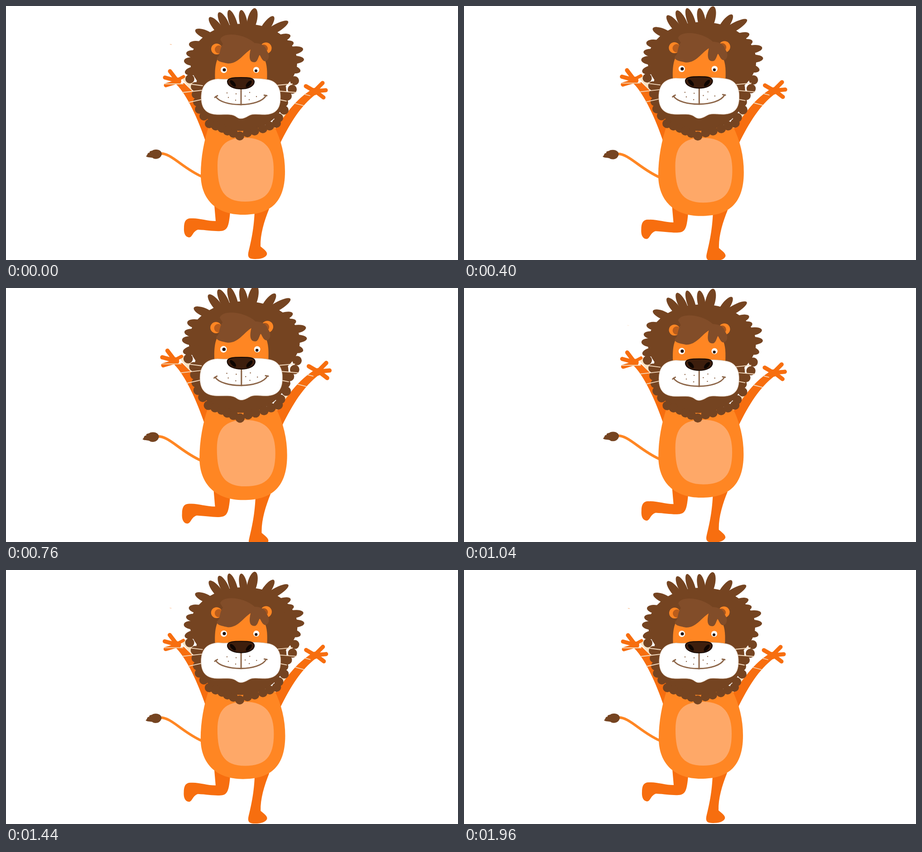
Animation of 998 by 561 pixels, one loop 2 s. Source, as an HTML page with a canvas:

```html
<!DOCTYPE html>
<html lang="en">
<head>
<meta charset="utf-8">
<title>Happy lion</title>
<style>
  html, body { margin: 0; width: 100%; height: 100%; overflow: hidden; background: #fff; }
  canvas { display: block; width: 998px; height: 561px; }
</style>
</head>
<body>
<canvas id="stage" width="998" height="561"></canvas>
<script>
const ctx = document.getElementById('stage').getContext('2d');
const W = 998, H = 561, STEP = 40, LOOP = 2000;
const LIMB = '#f76e0f', BODY = '#ff8623', BELLY = '#fea868', MANE = '#754421',
      FRINGE = '#824d29', CREAM = '#f8e3c4', LIP = '#8c6548';

function fill(d, color) {
  ctx.fillStyle = color;
  ctx.fill(new Path2D(d));
}

function line(d, color, width) {
  ctx.strokeStyle = color;
  ctx.lineWidth = width;
  ctx.stroke(new Path2D(d));
}

function oval(x, y, rx, ry, color, turn = 0) {
  ctx.fillStyle = color;
  ctx.beginPath();
  ctx.ellipse(x, y, rx, ry, turn, 0, Math.PI * 2);
  ctx.fill();
}

const dot = (x, y, r, color) => oval(x, y, r, r, color);

// Oval tuft stretched between its tip and its root
function tuft([x, y, rootX, rootY, width]) {
  const dx = rootX - x, dy = rootY - y;
  oval(x + dx / 2, y + dy / 2, Math.hypot(dx, dy) / 2, width / 2, MANE, Math.atan2(dy, dx));
}

const tufts = [
  [550, 5, 537, 58, 21], [519, 9, 529, 60, 17], [492, 9, 510, 62, 17],
  [470, 14, 494, 62, 18], [449, 25, 482, 66, 18], [418, 53, 462, 72, 18],
  [404, 84, 444, 90, 19], [398, 104, 440, 110, 18], [393, 121, 432, 124, 19],
  [395, 147, 434, 139, 19], [591, 23, 560, 66, 18], [623, 34, 564, 68, 18],
  [628, 65, 586, 78, 17], [635, 81, 596, 90, 17], [656, 95, 610, 102, 18],
  [658, 118, 610, 120, 18], [650, 144, 610, 134, 18]
];

const curls = [
  [406, 161], [418, 178], [420, 195], [423, 212], [427, 228], [437, 243],
  [449, 260], [463, 265], [477, 270], [489, 276], [502, 281], [516, 287],
  [533, 280], [549, 276], [567, 271], [582, 265], [597, 259], [602, 247],
  [614, 230], [613, 213], [621, 199], [632, 184], [637, 165]
];

function limbs() {
  // cream patches beside the mane
  fill('M386 158L402 153L416 172L411 189Z', CREAM);
  fill('M588 270L616 232L622 238L602 268Z', CREAM);

  // left arm and hand
  fill('M377 174C399 196 424 249 441 300L456 265L432 220L414 191L393 170Z', LIMB);
  line('M378 165L362 144M377 165L351 158M376 168L353 175', LIMB, 9);
  line('M379 163L392 156', LIMB, 7);
  dot(379, 166, 8, LIMB);

  // right arm and hand
  fill('M593 272C614 247 632 213 671 187L684 195C651 220 628 257 605 304Z', LIMB);
  line('M681 188L662 177M682 187L699 170M684 188L706 186M684 189L701 202', LIMB, 9);
  dot(681, 189, 8, LIMB);

  // legs
  fill('M460 440L463 475C445 475 425 468 410 469C397 468 393 476 393 490' +
       'C392 505 398 511 405 511C412 510 412 498 424 494C445 495 460 498 474 497' +
       'C490 496 492 485 495 455Z', LIMB);
  fill('M549 450C548 490 541 520 535 545C533 556 538 559 550 559' +
       'C562 559 573 556 576 549C578 543 569 537 562 531C561 505 570 475 581 448Z', LIMB);

  // tail
  line('M340 326C365 324 388 357 433 377', BODY, 5.6);
  fill('M309 332C314 328 311 324 317 324C316 319 322 321 325 318' +
       'C336 315 344 320 344 327C342 337 333 339 326 337C322 333 315 336 309 332Z', MANE);
}

function torso() {
  fill('M449 262C437 297 430 335 430 372C430 427 464 461 523 461' +
       'C579 461 616 438 616 366C616 330 608 297 592 265Z', BODY);
  fill('M467 352C467 310 484 291 527 291C575 291 591 318 591 362' +
       'C591 412 572 432 528 432C480 432 467 405 467 352Z', BELLY);
}

function mane() {
  oval(525, 124, 118, 85, MANE);
  oval(518, 190, 101, 86, MANE);
  tufts.forEach(tuft);
  curls.forEach(([x, y]) => dot(x, y, 10, MANE));
}

function face() {
  fill('M462 168C460 140 463 122 470 112L540 94L570 115C577 130 577 145 576 168Z', BODY);
  dot(465, 95, 12, BODY);
  dot(470, 96, 9, '#b95d1c');
  dot(574, 93, 12.5, BODY);
  dot(569, 94, 9, '#a9561d');
  fill('M473 74C478 57 525 60 549 82C562 82 574 88 575 98C583 106 582 122 571 122' +
       'C565 120 563 112 560 108C557 112 556 122 550 124C542 125 534 121 540 96' +
       'C524 106 512 128 490 127C475 124 464 122 466 114C474 110 470 96 479 84Z', FRINGE);

  dot(481, 141, 7, '#fff');
  dot(482, 141, 3.6, '#24130a');
  dot(552.5, 141, 6.6, '#fff');
  dot(552, 143, 3.1, '#24130a');

  // whiskers
  line('M351 172L391 172M403 172L434 176M390 191L434 186M403 213L434 206' +
       'M600 175L632 172M604 188L640 191M604 207L619 210' +
       'M638 215L657 220M659 195L671 198', '#f3d9bd', 1.8);

  const muzzle = 'M431 205C430 180 440 163 468 161C490 163 500 160 519 160' +
    'C540 160 560 159 580 163C600 167 607 185 606 203C606 228 595 239 572 240' +
    'C552 240 545 237 535 243C525 249 517 251 510 246C500 238 490 240 470 240' +
    'C445 240 432 230 431 205Z';
  fill(muzzle, '#fff');
  line(muzzle, '#c9ab91', 0.8);

  line('M519 184V218', LIP, 3);
  line('M463 200C478 224 560 224 574 198M461 202L467 198M570 197L576 198', LIP, 2.8);
  [[488, 192], [508, 194], [491, 202], [507, 208], [528, 199], [538, 191], [553, 200], [537, 207]]
    .forEach(([x, y]) => dot(x, y, 1.2, LIP));

  const nose = 'M489 168C488 158 505 158 519 158C535 158 548 158 548 168' +
    'C547 178 533 183 519 183C505 183 490 178 489 168Z';
  fill(nose, '#3d1e0d');
  line(nose, '#150903', 2);
  oval(501, 171, 9, 4, '#0d0502', 0.85);
  oval(536, 172, 9, 4, '#0d0502', -0.85);
}

// Linear swelling and shrinking, four times per loop
function swell(frame) {
  const period = 12.25, low = -0.125;
  const phase = ((frame - low) / period) % 1;
  return 1 - Math.abs(1 - 2 * phase);
}

function draw(time) {
  const size = swell(Math.floor((time % LOOP) / STEP));
  const scale = 1 + 0.047 * (size - 0.02);
  ctx.setTransform(1, 0, 0, 1, 0, 0);
  ctx.fillStyle = '#fff';
  ctx.fillRect(0, 0, W, H);
  ctx.translate(W / 2, H / 2);
  ctx.scale(scale, scale);
  ctx.translate(-W / 2, -H / 2);
  ctx.lineCap = ctx.lineJoin = 'round';

  ctx.globalAlpha = Math.max(0, 0.8 - 2.2 * size);
  line('M362.5 84.5Q364 85.5 365.5 85', '#f9a05c', 1.2);
  ctx.globalAlpha = 1;

  limbs();
  torso();
  mane();
  face();
}

const start = performance.now();
function tick() {
  draw(performance.now() - start);
  requestAnimationFrame(tick);
}
tick();
</script>
</body>
</html>
```
